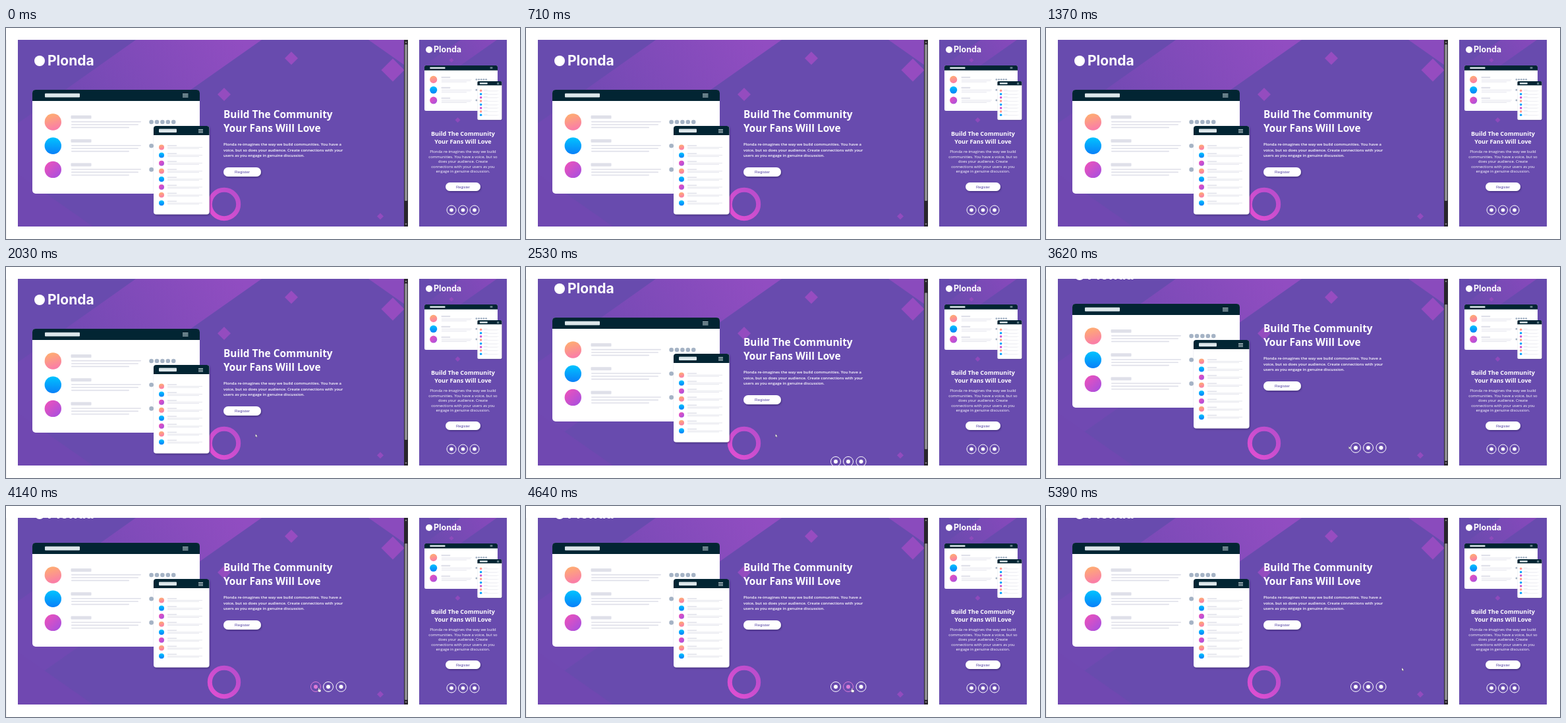
Recreate the animation shown at these times as an HTML page. Size 780 by 321 pixels, loop 5.49 s.

```html
<!DOCTYPE html>
<html lang="en">
<head>
<meta charset="utf-8">
<title>Landing page preview</title>
<style>
  html, body { margin: 0; width: 100%; height: 100%; overflow: hidden; background: #fff; }
  svg { display: block; width: 780px; height: 321px; }
  text { fill: #fff; font-family: "Open Sans", sans-serif; }
  .brand { font-family: Inter, sans-serif; font-weight: 700; }
  .title { font-weight: 700; }
  .button { fill: #5847a6; font-family: "Liberation Sans", sans-serif; text-anchor: middle; }
  .center { text-anchor: middle; }
  .social { color: #fff; }
  .social.hover { color: #dc7cd8; }
</style>
</head>
<body>
<svg viewBox="0 0 780 321">
  <defs>
    <linearGradient id="coral" x1="0" y1="0" x2="0.3" y2="1">
      <stop stop-color="#ffb26b"/><stop offset="1" stop-color="#fa7fa6"/>
    </linearGradient>
    <linearGradient id="blue" x1="0" y1="0" x2="0" y2="1">
      <stop stop-color="#00c3ff"/><stop offset="1" stop-color="#0a80f8"/>
    </linearGradient>
    <linearGradient id="violet" x1="0" y1="0" x2="1" y2="1">
      <stop stop-color="#f252b8"/><stop offset="1" stop-color="#a24fe2"/>
    </linearGradient>
    <linearGradient id="ringFill" x1="0" y1="1" x2="1" y2="0">
      <stop stop-color="#e24fd2"/><stop offset="1" stop-color="#b64dcb"/>
    </linearGradient>
    <linearGradient id="band" gradientUnits="userSpaceOnUse" x1="350" y1="10" x2="110" y2="170">
      <stop stop-color="#914dc1"/><stop offset="1" stop-color="#7049b2"/>
    </linearGradient>
    <linearGradient id="smallBand" gradientUnits="userSpaceOnUse" x1="735" y1="18" x2="650" y2="75">
      <stop stop-color="#8549bb"/><stop offset="1" stop-color="#6a4bae"/>
    </linearGradient>
    <clipPath id="desktopClip"><rect x="18" y="18" width="586" height="284"/></clipPath>
    <clipPath id="mobileClip"><rect x="627" y="18" width="133" height="284"/></clipPath>
    <filter id="shadow" x="-20%" y="-20%" width="140%" height="170%">
      <feDropShadow dx="1" dy="1.5" stdDeviation="1" flood-color="#2c1a60" flood-opacity=".6"/>
    </filter>
    <g id="mock"></g>
  </defs>

  <rect y="18" width="1" height="303" fill="#f2f2f2"/>

  <g clip-path="url(#desktopClip)">
    <rect x="18" y="18" width="586" height="284" fill="#684bae"/>
    <path d="M197 18H388L130 200L18 279V145Z" fill="url(#band)"/>
    <path d="M18 222L132 302H18Z" fill="#7048b1"/>
    <path d="M550 18H604V56Z" fill="#8a4bbd"/>
    <g id="desktopDiamonds"></g>
    <circle cx="331" cy="268" r="21.7" fill="none" stroke="url(#ringFill)" stroke-width="7"/>
    <g id="page"></g>
  </g>

  <rect x="604" y="18" width="6" height="284" fill="#29272d"/>
  <rect id="thumb" x="605" y="25" width="4" height="238" rx="1" fill="#8e8d91"/>
  <path d="M605.5 22.5L607 20.5L608.5 22.5ZM605.5 297.5L607 299.5L608.5 297.5Z" fill="#aaa"/>

  <g clip-path="url(#mobileClip)">
    <rect x="627" y="18" width="133" height="284" fill="#684bae"/>
    <path d="M690 18H745L627 101V62Z" fill="url(#smallBand)"/>
    <g id="mobileDiamonds"></g>
    <g id="mobile"></g>
  </g>

  <path id="arrow" d="M0 0V4.6L1.1 3.7L1.9 5.2L2.6 4.8L1.9 3.4H3.2Z" fill="#fff" stroke="#333" stroke-width=".3"/>
  <path id="hand" d="M0 0Q.8-.6 1.2 .3V2L3.6 2.6Q4.2 3 4 4L3.4 6H.6L-1.2 3.8Q-1.2 3-.2 3.4Z" fill="#fff" stroke="#333" stroke-width=".3"/>
</svg>
<script>
const LOOP = 5490;
const SCROLL_RANGE = 38;
const THUMB_RANGE = 32;
const byId = id => document.getElementById(id);

const rect = (x, y, w, h, fill, r = 0) =>
  `<rect x="${x}" y="${y}" width="${w}" height="${h}" rx="${r}" fill="${fill}"/>`;
const circle = (x, y, r, fill) => `<circle cx="${x}" cy="${y}" r="${r}" fill="${fill}"/>`;
const diamond = (x, y, r, fill) =>
  `<path d="M${x} ${y - r}L${x + r} ${y}L${x} ${y + r}L${x - r} ${y}Z" fill="${fill}"/>`;
const label = (x, y, size, cls, content) =>
  `<text x="${x}" y="${y}" font-size="${size}" class="${cls}">${content}</text>`;
const lines = (x, y, step, size, cls, rows) =>
  rows.map((row, i) => label(x, y + i * step, size, cls, row)).join("");
const menu = (x, y, w) => [0, 2.2, 4.4].map(d => rect(x, y + d, w, 1, "#dce6ea")).join("");
const button = (x, y, w, h, size) =>
  `<g filter="url(#shadow)">${rect(x, y, w, h, "#fff", h / 2)}</g>` +
  label(x + w / 2, y + h / 2 + size * 0.36, size, "button", "Register");
const social = (x, y, r) =>
  `<g class="social"><circle cx="${x}" cy="${y}" r="${r}" fill="none" stroke="currentColor"/>` +
  circle(x, y, r * 0.4, "currentColor") + "</g>";

const palette = ["coral", "blue", "violet"].map(name => `url(#${name})`);
const DARK = "#022533", PILL = "#dce6ea", GREY = "#dfe0e9";

// Browser window with a phone in front, drawn from its own top-left corner.
function mockup() {
  let out = rect(0, 0, 254, 158, "#fff", 5) +
    `<path d="M0 17V5Q0 0 5 0H249Q254 0 254 5V17Z" fill="${DARK}"/>` +
    rect(19, 5.5, 53, 6, PILL, 1) + menu(228, 6, 8.5);
  palette.forEach((fill, i) => {
    const y = 49 + i * 36.2;
    out += circle(31.3, y, 12.7, fill) + rect(58.5, y - 10, 31, 5, GREY, 1);
    [106, 102, 88].forEach((w, j) => out += rect(59, y - 1.2 + j * 4.4, w, 1.6, GREY, .8));
    for (let d = 0; d < (i ? 1 : 5); d++) out += circle(180.6 + d * 8.4, y, 3.3, "#a5b3c5");
  });
  out += `<g filter="url(#shadow)">${rect(184, 55, 84.5, 134.5, "#fff", 4)}</g>` +
    `<path d="M184 69V59Q184 55 188 55H264.5Q268.5 55 268.5 59V69Z" fill="${DARK}"/>` +
    rect(192, 59.5, 27, 5.5, PILL, 1) + menu(252, 60, 7);
  for (let i = 0; i < 8; i++) {
    const y = 87.5 + i * 12.1;
    out += circle(196, y, 4, palette[i % 3]) + rect(205, y - 3.4, 14, 1.5, GREY);
    [53, 48].forEach((w, j) => out += rect(205, y - .4 + j * 1.8, w, .8, GREY));
  }
  return out;
}
byId("mock").innerHTML = mockup();

byId("desktopDiamonds").innerHTML =
  diamond(433, 46, 10, "#974cc0") + diamond(587, 64, 17.5, "#954cc0") +
  diamond(331, 101, 10, "#944cbf") + diamond(568, 286.5, 5, "#924bbe");
byId("mobileDiamonds").innerHTML =
  diamond(676, 49, 3.5, "#8e4abb") + diamond(685.5, 140, 4, "#8e4abb");

const title = ["Build The Community", "Your Fans Will Love"];
const icons = [470, 489, 508.5];
const ICON_Y = 313;

byId("page").innerHTML =
  circle(51, 50, 8, "#fff") + label(63, 57, 21, "brand", "Plonda") +
  `<use href="#mock" x="40" y="94"/>` +
  lines(330, 137, 21, 15.4, "title", title) +
  `<g font-weight="600">` + lines(330, 179, 8.6, 5.98, "", [
    "Plonda re-imagines the way we build communities. You have a",
    "voice, but so does your audience. Create connections with your",
    "users as you engage in genuine discussion."]) + "</g>" +
  button(330, 212, 57, 14, 6.2) +
  icons.map(x => social(x, ICON_Y, 7.5)).join("");

byId("mobile").innerHTML =
  circle(642, 33, 5, "#fff") + label(649, 37, 12.5, "brand", "Plonda") +
  `<use href="#mock" transform="translate(635 57) scale(.437)"/>` +
  lines(693.5, 163.5, 12, 9, "title center", title) +
  lines(693.5, 190, 7.6, 5.9, "center", [
    "Plonda re-imagines the way we build",
    "communities. You have a voice, but so",
    "does your audience. Create",
    "connections with your users as you",
    "engage in genuine discussion."]) +
  button(667, 235, 53, 13, 5.7) +
  [676, 693.5, 711].map(x => social(x, 277, 7)).join("");

// Each key is [time, ...values]; values are interpolated in between.
const scrollKeys = [[2430, 0], [2530, 17], [2630, 32], [2730, SCROLL_RANGE]];
const cursorKeys = [
  [1830, 376, 246], [2030, 378.5, 254], [3230, 378.5, 254], [3530, 459.5, 272.5],
  [3730, 474, 277], [4130, 474, 277], [4330, 494, 277.5], [4730, 494, 277.5],
  [4930, 512, 277], [5130, 512, 277], [5330, 540, 246]];

function sample(keys, t) {
  const next = keys.findIndex(key => key[0] > t);
  if (next === 0) return keys[0].slice(1);
  if (next < 0) return keys[keys.length - 1].slice(1);
  const a = keys[next - 1], b = keys[next];
  const p = (t - a[0]) / (b[0] - a[0]);
  return a.slice(1).map((v, i) => v + (b[i + 1] - v) * p);
}

const socials = [...byId("page").querySelectorAll(".social")];

function draw(now) {
  const t = Math.floor(((now % LOOP) - 30) / 100) * 100 + 30;
  const [scroll] = sample(scrollKeys, t);
  const [x, y] = sample(cursorKeys, t);
  byId("page").setAttribute("transform", `translate(0 ${-scroll})`);
  byId("thumb").setAttribute("y", 25 + scroll / SCROLL_RANGE * THUMB_RANGE);

  const hovered = icons.findIndex(cx => Math.hypot(x - cx, y - ICON_Y + scroll) < 8);
  socials.forEach((icon, i) => icon.classList.toggle("hover", i === hovered));
  const visible = t >= cursorKeys[0][0];
  [["arrow", hovered < 0], ["hand", hovered >= 0]].forEach(([id, on]) => {
    const pointer = byId(id);
    pointer.setAttribute("transform", `translate(${x} ${y})`);
    pointer.setAttribute("visibility", visible && on ? "visible" : "hidden");
  });
}

const start = performance.now();
function tick() {
  draw(performance.now() - start);
  requestAnimationFrame(tick);
}
tick();
</script>
</body>
</html>
```
